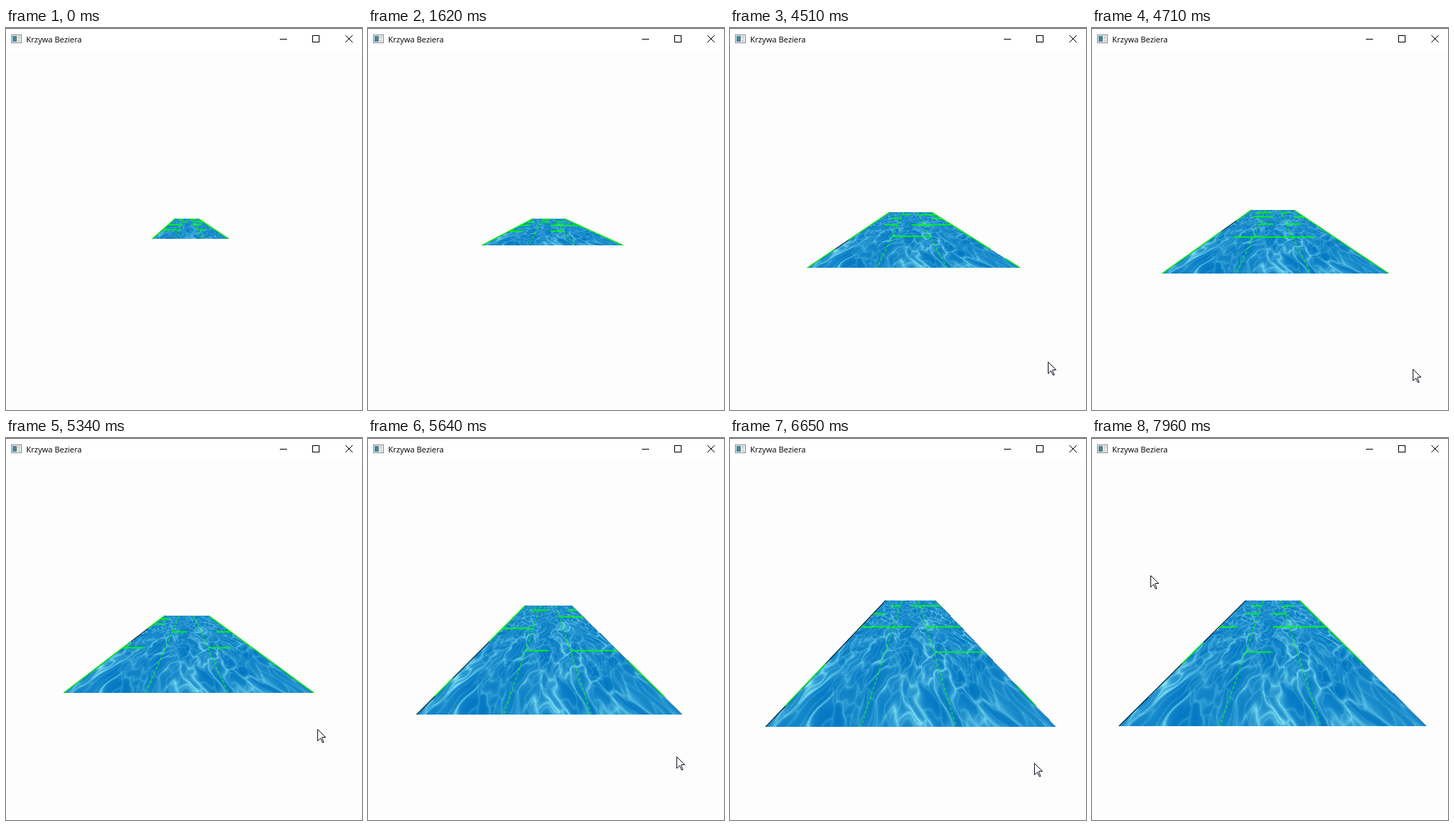
Write an HTML page with a canvas that moves like this. It is 494 by 529 pixels and loops after 8 s.

```html
<!DOCTYPE html>
<html lang="pl">
<head>
<meta charset="utf-8">
<title>Krzywa Beziera</title>
<style>
html, body { margin: 0; width: 494px; height: 529px; overflow: hidden; background: #fdfdfd; }
canvas, svg { position: absolute; left: 0; top: 0; }
text { font: 11px "Open Sans", "Noto Sans", sans-serif; }
</style>
</head>
<body>
<canvas id="stage" width="494" height="529"></canvas>
<svg width="494" height="529">
  <rect width="494" height="31" fill="#fff"/>
  <rect width="494" height="1" fill="#555"/>
  <rect x="7.5" y="9.5" width="14" height="11" fill="#f4f4f4" stroke="#8a8a8a"/>
  <path d="M9 11h6v8h-6z" fill="#4a8595"/>
  <path d="M16 11h4v4h-4zM16 16h4v3h-4z" fill="#d0d7da"/>
  <text x="28" y="20">Krzywa Beziera</text>
  <g fill="none" stroke="#000">
    <path d="M380 15.5h10M425.5 10.5h9v9h-9z" shape-rendering="crispEdges"/>
    <path d="M471 10l10 10M481 10l-10 10"/>
  </g>
  <path id="cursor" d="M.5 .5V16.5L4.5 12.8 7 18.5H9L6.6 12.5V11.5H11.5Z" fill="#fff" stroke="#112"/>
</svg>
<script>
const LOOP = 8000, W = 494, H = 529, GREEN = '#0f0';
const TILT_START = 3740, TILT_END = 5890;
const ctx = document.getElementById('stage').getContext('2d');
const cursor = document.getElementById('cursor');

// time, far width, near width, far y, near y
const POSES = [
  [TILT_START, 55, 313, 264, 310], [4510, 58, 295, 255, 332],
  [5050, 61, 347, 246, 353], [5400, 61, 347, 246, 353],
  [5640, 65, 369, 232, 383], [TILT_END, 66, 370, 225, 393],
  [6650, 70, 403, 225, 400], [7420, 75, 427, 225, 399]
];

// time, x, y
const PATH = [
  [TILT_START, 500, 390], [4510, 441, 462], [4560, 441, 462], [5000, 452, 491],
  [5340, 432, 403], [5640, 428, 441], [5890, 432, 458], [6140, 432, 458],
  [6250, 422, 450], [7420, 422, 450], [7960, 81, 190]
];

const mix = (a, b, k) => a + (b - a) * k;
const hash = (x, y) => {
  const s = Math.sin(x * 127.1 + y * 311.7) * 43758.5453;
  return s - Math.floor(s);
};

function sample(keys, t) {
  let i = keys.length - 1;
  while (i > 0 && keys[i][0] > t) i--;
  const a = keys[i], b = keys[i + 1] || a;
  const k = b === a ? 0 : Math.max(0, (t - a[0]) / (b[0] - a[0]));
  return a.map((n, j) => mix(n, b[j], k)).slice(1);
}

// The floor jumps nearer in steps, tilts smoothly, then steps again.
function poseAt(t) {
  if (t < TILT_START) {
    const n = Math.min(3, Math.floor((t + 505) / 1051));
    return [32 + 5.7 * n, 106 + 38 * n + 3.5 * n * n, 264, 292 + 4.7 * n];
  }
  if (t < TILT_END) return sample(POSES, t);
  return POSES.findLast(p => p[0] <= t).slice(1);
}

// Cell borders: bright where the two nearest seed points are equally far.
function net(x, y) {
  const cx = Math.floor(x), cy = Math.floor(y);
  let first = 9, second = 9;
  for (let j = cy - 1; j <= cy + 1; j++) for (let i = cx - 1; i <= cx + 1; i++) {
    const d = Math.hypot(i + hash(i, j) - x, j + hash(j + 57, i) - y);
    if (d < first) [first, second] = [d, first];
    else if (d < second) second = d;
  }
  return Math.exp(-9 * (second - first));
}

const N = 512, water = new Float32Array(N * N);
for (let j = 0; j < N; j++) for (let i = 0; i < N; i++) {
  const x = i / N * 11, y = j / N * 11;
  const wx = x + .3 * Math.sin(y * 2.3 + Math.sin(x * 1.7)) + .08 * Math.sin(y * 9 + x * 4);
  const wy = y + .3 * Math.sin(x * 2.1 + 2 * Math.sin(y * 1.3)) + .08 * Math.sin(x * 8 - y * 5);
  const power = .5 + .35 * Math.sin(x * 1.3 + 2 * Math.sin(y * .9)) * Math.sin(y * 1.1 + x * .4);
  const swell = Math.sin(x * 1.9 + 2 * Math.sin(y * 1.4)) * Math.sin(y * 2.2 + x * .7);
  water[j * N + i] = net(wx, wy) * power + .3 * net(wx * 2.1 + 9, wy * 1.7 + 4) + .09 * swell;
}

function floorOf([farWidth, nearWidth, farY, nearY]) {
  const top = Math.round(farY), bottom = Math.round(nearY);
  const nearX = 256.5 - (264 - farY) * .14, ratio = nearWidth / farWidth;
  return {
    top, bottom,
    x: (u, t) => mix(251, nearX, t) + (u - .5) * mix(farWidth, nearWidth, t),
    depth: t => (1 / mix(1 / ratio, 1, t) - 1) / (ratio - 1),
    height: v => (1 / (1 + v * (ratio - 1)) - 1 / ratio) / (1 - 1 / ratio)
  };
}

function drawWater(f) {
  const h = f.bottom - f.top, img = ctx.createImageData(W, h);
  for (let row = 0; row < h; row++) {
    const xl = f.x(0, row / h), xr = f.x(1, row / h);
    const lines = [0, .33, .66].map(d => Math.min(N - 1, Math.floor(f.depth((row + d) / h) * N)) * N);
    for (let x = Math.ceil(xl); x < xr; x++) {
      const u = Math.floor((x - xl) / (xr - xl) * N);
      const k = lines.reduce((sum, l) => sum + water[l + u], 0) / 3;
      img.data.set([12 + k * 125, 127 + k * 105, 198 + k * 48, 255], (row * W + x) * 4);
    }
  }
  ctx.putImageData(img, 0, f.top);
}

function drawGrid(f) {
  const seed = f.top + f.bottom * 3;
  const line = (u0, t0, u1, t1, color = GREEN, width = 1.3, dash = []) => {
    const y = t => mix(f.top, f.bottom, t) + (t0 === t1 ? .5 - mix(f.top, f.bottom, t) % 1 : 0);
    ctx.strokeStyle = color;
    ctx.lineWidth = width;
    ctx.setLineDash(dash);
    ctx.beginPath();
    ctx.moveTo(f.x(u0, t0), y(t0));
    ctx.lineTo(f.x(u1, t1), y(t1));
    ctx.stroke();
  };
  // Each line shows only some of its pieces through the water.
  const pieces = (id, chance, draw) => {
    for (let i = 0; i < 6; i++) if (hash(seed + i, id) < chance) draw(i / 6, (i + 1) / 6);
  };

  line(0, 0, 0, 1, '#05202c');
  for (const u of [0, 1]) pieces(u, (f.top - 200) / 64, (a, b) => line(u, a, u, b));
  for (const u of [.328, .656]) line(u, 0, u, 1, GREEN, 1.2, [4, 3]);
  for (let row = 1; row < 5; row++) {
    const t = f.height(row / 5);
    pieces(row + 1, .4, (a, b) => line(a, t, b, t, GREEN, 1.6));
  }
}

let shown = '';
function frame(now) {
  const t = now % LOOP, pose = poseAt(t), key = pose.join();
  if (key !== shown) {
    const f = floorOf(pose);
    ctx.clearRect(0, 0, W, H);
    drawWater(f);
    drawGrid(f);
    shown = key;
  }
  const [x, y] = sample(PATH, t).map(Math.round);
  cursor.setAttribute('transform', `translate(${x} ${y})`);
  requestAnimationFrame(frame);
}
frame(0);
</script>
</body>
</html>
```
